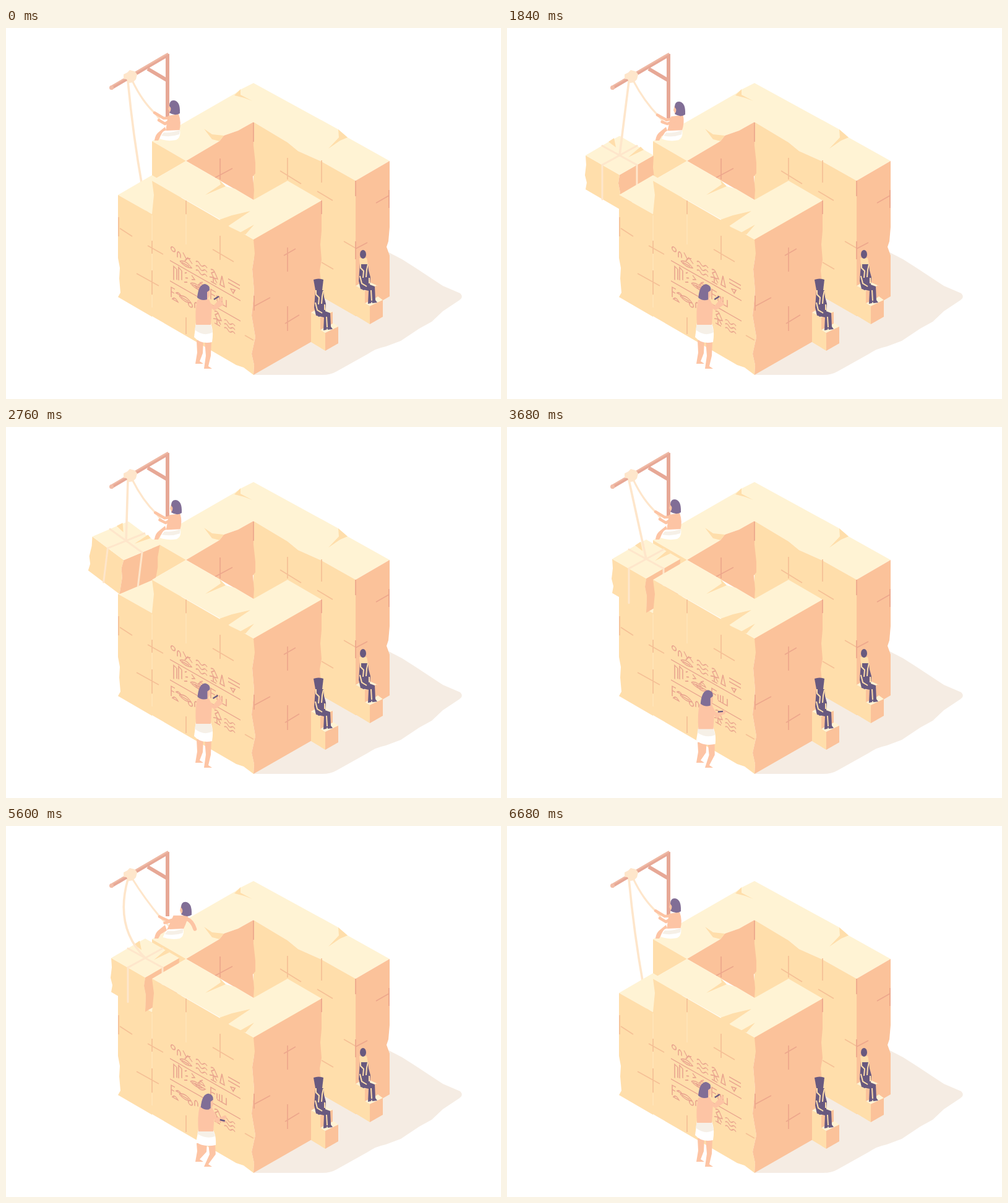
An HTML page for the animation above (6.72 s loop, 800 by 600 pixels).

```html
<!DOCTYPE html>
<html lang="en">
<head>
<meta charset="utf-8">
<title>Temple builders</title>
<style>
html, body { margin: 0; width: 100%; height: 100%; overflow: hidden; background: #fff }
svg { display: block; width: 800px; height: 600px }
.top { fill: #fff3d4 }
.left { fill: #ffdeab }
.right { fill: #fbc29a }
.skin { fill: #fdc4a4 }
.hair { fill: #816e96 }
.dark { fill: #68597f }
.line { fill: none; stroke: #f5c096; stroke-width: 1.7 }
.deep { stroke: #eda78c }
.rope { fill: none; stroke: #fee6cb; stroke-width: 3.6; stroke-linecap: round }
.limb { fill: none; stroke: #fdc4a4; stroke-width: 6; stroke-linecap: round; stroke-linejoin: round }
.glyph { fill: none; stroke: #e9a58f; stroke-width: 1.6 }
</style>
</head>
<body>
<svg viewBox="0 0 800 600">
  <defs>
    <g id="seat">
      <path class="left" d="M493 460L508 468V488L516 493V522L493 508Z"/>
      <path class="top" d="M493 460L509 451L529 460L508 468ZM508 488L529 477L537 483L516 493Z"/>
      <path class="right" d="M508 468L528 459V478L508 488ZM516 493L537 483V510L516 522Z"/>
    </g>
    <g id="king">
      <path class="dark" d="M500 424H513L514 435L517 446L516 458L524 461L525 483L528 487L520 488L519 485L518 488L513 489L514 468L501 465L498 452L499 438Z"/>
      <path fill="none" stroke="#ffdeab" stroke-width="2" d="M501 424V431L506 436L505 447M513 425L511 434L510 446M500 444L503 456L511 461M515 447V456M518 467L519 484"/>
      <path class="dark" d="M500 461L508 460L511 466L505 467Z"/>
    </g>
  </defs>

  <path fill="#f5ece3" d="M400 561H511Q525 561 535 555L585 527Q598 518 614 515L638 506L668 486L688 475L706 458L733 440Q740 435 734 429L706 417L662 388L640 374L615 361L500 420V480Z"/>

  <!-- rear walls -->
  <path class="top" d="M236 183L370 106L380 99L400 89L537 164L552 177L620 215L565 247L510 216L472 199L455 185L400 152L375 166L352 174L345 183L291 215Z"/>
  <path class="left" d="M400 152L455 185L472 199L510 216L565 247V466L400 371Z"/>
  <path class="right" d="M565 247L620 215V322L618 345L615 354L620 368V434L565 466Z"/>
  <path class="right" d="M291 215L345 183L352 174L375 166L400 152V190L403 218V235L399 240L401 262L400 278Z"/>
  <path class="left" d="M236 183L291 215L236 247Z"/>
  <path class="left" d="M320 163L333 172L352 174L345 183L333 180ZM379 99V108L398 118L385 113L369 109ZM537 164L552 177L540 182L521 195L538 177Z"/>
  <path class="line" d="M455 210V245M443 231L477 252M510 214V250M503 264L528 279M546 345L565 356M510 379L529 390"/>
  <path class="line deep" d="M346 211V245M338 242L366 227M400 153V184M565 247V272M565 345V374M565 357L584 347M598 283L619 271M619 262V291"/>

  <g id="behind"></g>
  <path class="top" d="M181 270L236 238L291 270L236 301Z"/>
  <path class="left" d="M181 270L236 301V467L181 435L185 428L183 405L184 388L181 372Z"/>
  <g id="above"></g>

  <!-- front wall -->
  <path class="left" d="M236 247L400 342L402 365L398 390L401 425L397 465L403 500L397 527L401 545L400 561L384 549L372 545L236 466V301L239 270Z"/>
  <path class="right" d="M400 342L510 279V328L508 350L510 375L507 392L510 420V498L400 561L401 545L397 527L403 500L397 465L401 425L398 390L402 365Z"/>
  <path class="top" d="M291 215L345 246L355 256L370 260L400 278L455 247L510 279L400 342L385 333L362 322L345 309L236 247Z"/>
  <path class="left" d="M345 246L355 256L322 270L347 253ZM345 310L365 303L395 296L358 321ZM378 331L401 318L387 334Z"/>
  <path class="line" d="M346 336V375M334 358L368 378M291 279V301M291 468V495M182 306V337M184 324L204 337M236 344V365M229 352L254 366M236 392V431M211 397L247 417M386 497L400 505"/>
  <path fill="none" stroke="#ffe5bb" stroke-width="1.5" d="M236 303V344M236 365V392M291 302V350M236 432V452"/>
  <path class="line deep" d="M455 355V394M449 368L468 357M455 450V490M451 478L474 464M401 450L427 436M401 433V457M510 279V301"/>

  <!-- inscription, sheared into the plane of the wall -->
  <g class="glyph" transform="matrix(1 .57 0 1 265 376)">
    <path d="M0 0H114M0 33H114"/>
    <circle cx="5" cy="-21" r="3.3"/><circle cx="33" cy="53" r="3.3"/>
    <path id="n" d="M12 -12V-19Q14 -25 17 -19V-14"/>
    <path d="M21 -25L26 -18L33 -22M24 -13L29 -21L36 -15"/>
    <path id="eye" d="M16 -8Q25 -16 35 -8Q25 -2 16 -8M19 -8H31"/>
    <path id="waves" d="M42 -22q3 -4 6 0t6 0t6 0M42 -15q3 -4 6 0t6 0t6 0M42 -8q3 -4 6 0t6 0t6 0"/>
    <path id="bird" d="M66 -23q5 -4 7 2l4 7l-6 2l-4 -6l5 -5M64 -10l7 -3l5 6M70 -12v8M66 -4h9"/>
    <path d="M81 -7L84 -23L88 -7ZM94 -24H113M94 -18H113M98 -10L105 -12L102 -5Z"/>
    <path d="M6 28V6L11 8V25M14 24V3L19 6V21M24 7l3 -3M25 14l4 -2M23 22l5 -3M35 4l5 4l-5 3"/>
    <use href="#eye" transform="translate(17 26)"/>
    <path d="M46 13q5 -8 10 0zM48 9l5 -4M40 17H57Q49 27 40 17M66 8V25M66 9H74M66 16H73M76 22V13M80 23V12M84 23V11M76 23H91V12"/>
    <path d="M2 58V42H8M2 49H7M4 60q4 -7 9 0zM10 47q4 -5 8 0z"/>
    <use href="#eye" transform="translate(-1 57)"/><use href="#n" transform="translate(28 66)"/>
    <use href="#bird" transform="translate(6 64)"/>
    <use href="#waves" transform="translate(48 66) scale(.95 .9)"/>
  </g>

  <use href="#seat"/><use href="#king"/>
  <path class="dark" d="M497 407Q505 404 513 407L511 424H500Z"/>
  <g transform="translate(72 -43)">
    <use href="#seat"/><use href="#king"/>
    <path class="left" d="M499 415H511L513 425H500Z"/>
    <ellipse class="dark" cx="505" cy="409" rx="5" ry="7"/>
  </g>

  <!-- carver -->
  <path id="legs" class="skin"/>
  <path id="kilt" fill="#fff"/>
  <path id="kiltShade" fill="#f6f0e7"/>
  <g id="carver">
    <path class="skin" d="M309 440Q316 436 328 439L333 450L331 480H307Q305 455 309 440Z"/>
    <g id="carverHead">
      <path class="skin" d="M322 420L329 424V433L324 441L318 439Z"/>
      <path class="hair" d="M309 436Q311 414 322 414Q330 416 329 424L325 427V439Q316 442 309 436Z"/>
    </g>
    <path id="carverArm" class="limb" stroke-width="5" style="stroke-width:5"/>
    <path id="chisel" fill="none" stroke="#68597f" stroke-width="2.4"/>
  </g>

  <!-- crane -->
  <path id="pull" class="rope" style="stroke-width:3"/>
  <g fill="none" stroke="#e7a896" stroke-width="6">
    <path d="M261 42V146M229 66L261 85"/>
    <path d="M170 97L262 43"/>
    <path stroke="#efb9a4" stroke-width="2.5" d="M169 95L262 41"/>
  </g>
  <circle cx="170.500" cy="96.500" r="3.500" fill="#f2bda8"/>
  <path fill="#fee6cb" d="M190 75L196 72L200 68L208 70L212 75L210 83L205 88L198 89L195 83L190 82Z"/>

  <!-- hauler -->
  <path class="skin" d="M240 182Q241 173 246 169L257 160L260 169L250 175L246 182Z"/>
  <path id="torso" class="skin"/>
  <path id="backArm" class="limb"/>
  <g id="skirt">
    <path fill="#fff" d="M248 179Q253 164 260 166L281 165Q283 177 275 181Q261 184 248 179Z"/>
    <path fill="#f6f0e7" d="M255 169Q268 170 281 165L280 172Q266 177 251 174Z"/>
  </g>
  <path id="arms" class="limb" style="stroke-width:4.500"/>
  <g id="haulerHead">
    <path class="skin" d="M264 123L262 131L265 138L271 137Z"/>
    <path class="hair" d="M264 126Q264 117 271 117Q282 118 281 138Q273 143 264 137Q269 131 264 126Z"/>
  </g>

  <g id="load">
    <g id="stone">
      <path class="left" d="M-55 0L0 31.500L-2 45L1 60L0 87L-55 55L-53 44L-56 32L-54 15Z"/>
      <path class="right" d="M0 31.500L55 0L54 20L56 36L55 55L0 87L1 60L-2 45Z"/>
      <path class="top" d="M-55 0L-14 -24L0 -31.500L55 0L0 31.500Z"/>
      <path class="left" d="M-9 -28L-6 -13L-18 -22ZM34 -14L39 -9L14 3Z"/>
      <path class="rope" style="stroke-width:3" d="M-28 -15.500L28 15.500V70M28 -15.500L-28 15.500V71"/>
    </g>
    <path id="line" class="rope"/>
  </g>
</svg>
<script>
const LOOP = 6720;
const $ = id => document.getElementById(id);
const set = (id, d) => $(id).setAttribute('d', d);
const move = (id, v) => $(id).setAttribute('transform', v);

// rows of [time, value...]
const stoneKeys = [
  [0, 238, 345, -6], [600, 204, 292, -14], [1160, 189, 246, -13], [1500, 187, 224, -8],
  [1840, 182, 206, 0], [2200, 159, 194, 8], [2760, 194, 184, 7], [3020, 216, 181, 2],
  [3240, 225, 201, 0], [3400, 225, 213.5, 0], [5640, 225, 213.5, 0], [5850, 172, 214, -3],
  [6000, 150, 232, -8], [6180, 166, 285, -8], [6400, 215, 345, -7], [6600, 238, 345, -6], [LOOP, 238, 345, -6]
];
const leanKeys = [
  [0, 0], [340, 10], [680, 2], [1160, 10], [1500, 3], [1840, 7], [2200, 11], [2760, 3],
  [3300, 0], [4100, 0], [5000, 11], [5600, 19], [5900, 19], [6300, 6], [6600, 0], [LOOP, 0]
];
const slackKeys = [[0, 8], [700, 0], [4100, 0], [5000, 26], [5600, 36], [5850, 4], [6100, 0], [6600, 8], [LOOP, 8]];
const crouchKeys = [[0, 0], [3000, 0], [3680, .6], [4050, 1], [5640, 1], [6600, 0], [LOOP, 0]];

// monotone cubic through column c of the rows
function at(keys, t, c = 1) {
  let i = 0;
  while (i < keys.length - 2 && t >= keys[i + 1][0]) i++;
  const rate = j => j < 0 || j > keys.length - 2 ? 0 :
    (keys[j + 1][c] - keys[j][c]) / (keys[j + 1][0] - keys[j][0]);
  const tangent = j => {
    const a = rate(j - 1), b = rate(j);
    return a * b > 0 ? 2 * a * b / (a + b) : 0;
  };
  const h = keys[i + 1][0] - keys[i][0], u = (t - keys[i][0]) / h, v = 1 - u;
  return v * v * (1 + 2 * u) * keys[i][c] + u * u * (3 - 2 * u) * keys[i + 1][c]
    + h * u * v * (v * tangent(i) - u * tangent(i + 1));
}

function drawLoad(t) {
  const [x, y, turn] = [1, 2, 3].map(c => at(stoneKeys, t, c));
  const layer = $(t > 2700 && t < 5900 ? 'above' : 'behind');
  if ($('load').parentNode !== layer) layer.append($('load'));
  move('stone', `translate(${x} ${y}) rotate(${turn})`);
  const slack = at(slackKeys, t);
  set('line', `M197 86Q${(197 + x) / 2 - slack} ${(86 + y) / 2 + slack * .4} ${x} ${y}`);
}

function drawHauler(t) {
  const l = at(leanKeys, t), reach = Math.max(0, (l - 10) / 9);
  const hx = 240 + .42 * l, hy = 137 + .5 * l;
  set('torso', `M${258 + .1 * l} 168Q${260 + .4 * l} 152 ${262 + .45 * l} ${142 + .15 * l}
    L${279 + .8 * l} ${139 + .3 * l}Q${284 + .5 * l} 153 ${280 + .35 * l} 167Z`);
  set('arms', `M${267 + .6 * l} ${145 + .2 * l}L${255 + .4 * l} ${146 + .4 * l}L${hx} ${hy}
    M${268 + .6 * l} ${148 + .2 * l}L${257 + .3 * l} 155L${247 + .5 * l} ${149 + .4 * l}`);
  set('backArm', reach ? `M${278 + .7 * l} ${142 + .4 * l}q${10 * reach} ${4 * reach} ${14 * reach} ${17 * reach}` : '');
  set('pull', `M204 85Q${220 + .2 * l} ${119 - .1 * l} ${hx + 2} ${hy + 2}L${248 + .8 * l} ${147 + .75 * l}`);
  move('skirt', `translate(${.3 * l} ${.05 * l})`);
  move('haulerHead', `translate(${l} ${.3 * l})`);
}

function drawCarver(t) {
  const c = at(crouchKeys, t), dx = 4 * c, dy = 14 * c;
  const tap = (1 - Math.cos(t / 480 * 2 * Math.PI)) / 2;
  move('carver', `translate(${dx} ${dy})`);
  move('carverHead', `translate(${tap + c} ${tap + 4 * c})`);
  const k = 6 * c, hip = 505 + 8 * c;
  set('legs', `M308 ${hip}H${319 + k}L${318 + k} ${526 + c}L313 539L319 543H306L309 ${525 + c}Z
    M${321 + k} ${hip}H${332 + k}L${331 + k * 1.3} ${530 + c}L327 547L333 551H320L${323 + k} ${530 + c}Z`);
  set('kilt', `M${307 + dx} ${477 + dy}L${331 + dx} ${478 + dy}Q${336 + dx} ${490 + dy * .8} ${333 + k} ${508 + 8 * c}
    Q${315 + dx} ${512 + 8 * c} ${304 + dx * .8} ${500 + 11 * c}Z`);
  set('kiltShade', `M${307 + dx} ${477 + dy}L${331 + dx} ${478 + dy}L${334 + dx} ${492 + dy * .7}
    Q${320 + dx} ${500 + dy * .5} ${305 + dx} ${488 + dy * .7}Z`);
  const x = 349 - 3 * tap + 3 * c, y = 447 + 20 * c, low = 19 * c;
  set('carverArm', `M327 445L337 ${454 + .5 * low}L${x} ${y - .5 * low - 1}M338 ${450 + .5 * low}L${x - 1} ${439 + 1.3 * low}`);
  const tx = 336 - 3 * tap + 8 * c, ty = 439 + 22 * c;
  set('chisel', `M${tx} ${ty}l8 ${-5 + 7 * c}`);
}

function frame(now) {
  const t = now % LOOP;
  drawLoad(t);
  drawHauler(t);
  drawCarver(t);
  requestAnimationFrame(frame);
}
frame(0);
</script>
</body>
</html>
```
